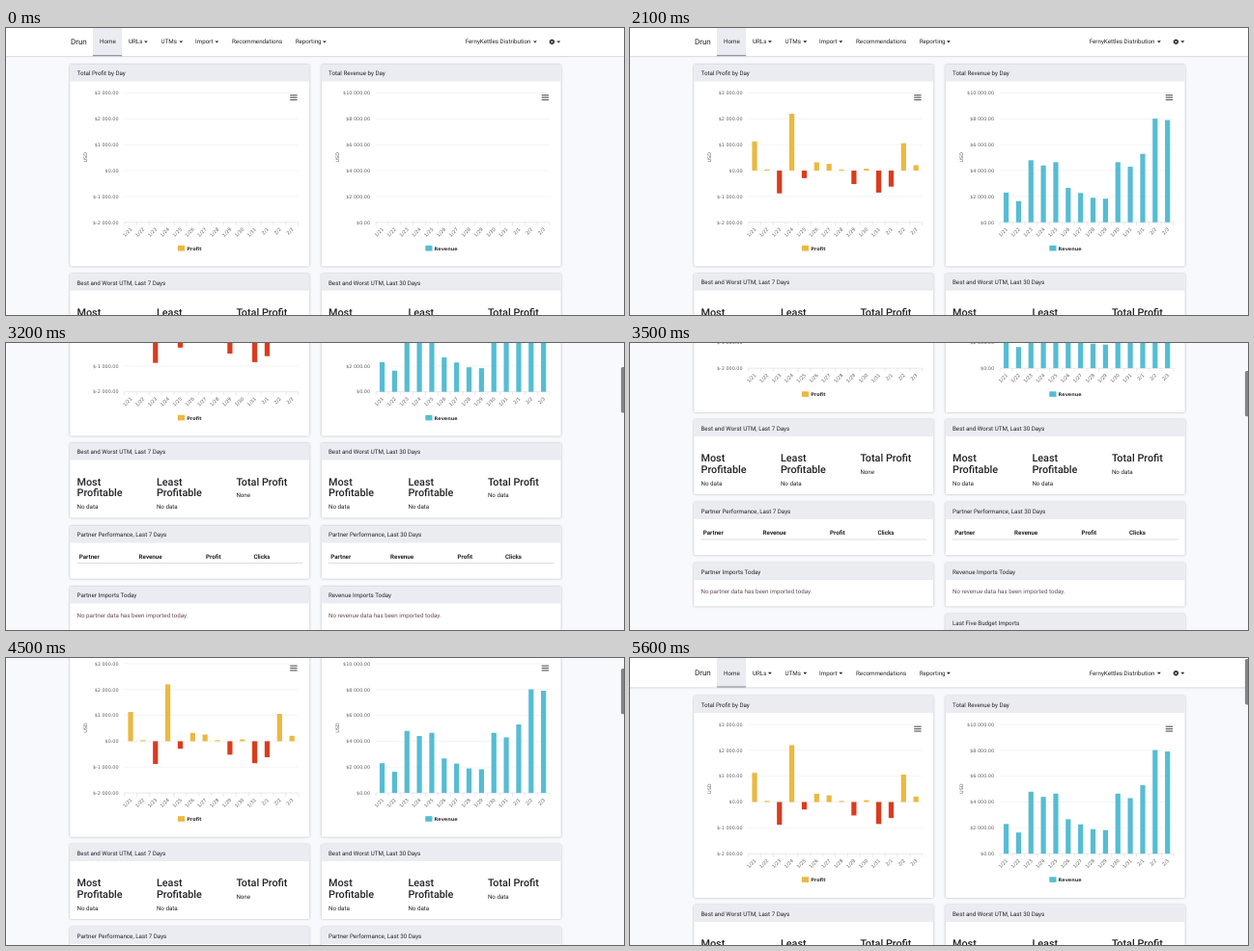
Write an HTML page that moves like this. It is 640 px wide and 298 px high and loops after 5.7 s.

```html
<!DOCTYPE html>
<html lang="en">
<head>
<meta charset="utf-8">
<title>Dashboard</title>
<style>
html, body { margin: 0; width: 100%; height: 100%; overflow: hidden; background: #f8f9fc; }
svg { display: block; text-rendering: geometricPrecision; }
text { font: 6.22px Roboto, sans-serif; fill: #232328; }
.brand { font-size: 8px; }
.big { font-size: 10.8px; font-weight: 500; }
.th { font-weight: 700; }
.note { fill: #6b4b50; }
.axis { font: 4.9px "DejaVu Sans", sans-serif; fill: #606060; }
.legend { font: bold 4.9px "DejaVu Sans", sans-serif; fill: #333; }
.card { filter: drop-shadow(0 .6px 1.2px rgba(0, 0, 0, .3)); }
.nav { filter: drop-shadow(0 .6px 1px rgba(0, 0, 0, .3)); }
</style>
</head>
<body>
<svg id="stage" width="640" height="298" viewBox="0 0 640 298"></svg>
<script>
const LOOP = 5700, GROW = 850;
const stage = document.getElementById('stage');

const text = (x, y, s, cls = '', extra = '') => `<text x="${x}" y="${y}" class="${cls}" ${extra}>${s}</text>`;
const rect = (x, y, w, h, fill, extra = '') => `<rect x="${x}" y="${y}" width="${w}" height="${h}" fill="${fill}" ${extra}/>`;
const line = (x1, y1, x2, y2, color, w = .5) => `<path d="M${x1} ${y1}L${x2} ${y2}" stroke="${color}" stroke-width="${w}"/>`;
const caret = x => `<path d="M${x} 13.4h3.8l-1.9 2.1z" fill="#232328"/>`;

function card(x, y, h, title) {
  return `<g class="card">${rect(x, y, 248, h, '#fff', 'rx="1.5"')}</g>` +
    `<path d="M${x} ${y + 17.5}v-16q0-1.5 1.5-1.5h245q1.5 0 1.5 1.5v16z" fill="#ebecf1"/>` +
    text(x + 7.3, y + 11.3, title);
}

const dates = Array.from({ length: 14 }, (_, i) => i < 11 ? `1/${21 + i}` : `2/${i - 10}`);
const money = v => `$${v < 0 ? '-' : ''}${v ? Math.abs(v) / 1000 + ' 000' : 0}.00`;

// x is the left edge of the card; values span [min, max]
function chart(x, { title, name, color, min, max, step, values, legendX }) {
  const left = x + 56.4, width = 180, slot = width / 14, top = 67.6, bottom = 201.8;
  const scale = (bottom - top) / (max - min), toY = v => bottom - (v - min) * scale;
  let out = card(x, 38, 209.5, title);
  for (let v = min; v <= max; v += step) {
    out += line(left, toY(v), left + width, toY(v), v === min ? '#ccd3e2' : '#e8e8e8');
    out += text(x + 50.4, toY(v) + 1.8, money(v), 'axis', 'text-anchor="end"');
  }
  dates.forEach((d, i) => {
    const cx = left + slot * (i + .5);
    out += line(left + slot * i, bottom, left + slot * i, bottom + 3.5, '#ccd3e2');
    out += text(0, 0, d, 'axis', `text-anchor="end" transform="translate(${cx + 1.9} 209.4) rotate(-45)"`);
  });
  out += line(left + width, bottom, left + width, bottom + 3.5, '#ccd3e2');
  const bars = values.map((v, i) =>
    rect(left + slot * (i + .5) - 2.6, Math.min(0, -v * scale), 5.2, Math.abs(v) * scale, v < 0 ? '#dc3b1c' : color));
  out += `<g class="bars" data-base="${toY(0)}">${bars.join('')}</g>`;
  out += text(0, 0, 'USD', 'axis', `text-anchor="middle" transform="translate(${x + 18} 134.3) rotate(-90)"`);
  for (const y of [69.8, 72.2, 74.6]) out += line(x + 228, y, x + 235.4, y, '#606060', 1.2);
  return out + rect(legendX, 225.9, 7.2, 5.6, color) + text(legendX + 9.3, 230.7, name, 'legend');
}

function column(x, days, total, source) {
  let out = card(x, 255.2, 77.4, `Best and Worst UTM, Last ${days} Days`);
  const [a, b, c] = [7.3, 89.7, 172.2].map(d => x + d);
  for (const [tx, word] of [[a, 'Most'], [b, 'Least']]) {
    out += text(tx, 298.9, word, 'big') + text(tx, 310.5, 'Profitable', 'big') + text(tx, 323.4, 'No data');
  }
  out += text(c, 298.9, 'Total Profit', 'big') + text(c, 311.6, total);
  out += card(x, 341.2, 54.6, `Partner Performance, Last ${days} Days`);
  ['Partner', 'Revenue', 'Profit', 'Clicks'].forEach((s, i) =>
    out += text(x + [9.6, 71.4, 140.8, 190.2][i], 374.7, s, 'th'));
  out += line(x + 7.3, 379.6, x + 241, 379.6, '#cfcfd4', .7);
  out += card(x, 404.2, 45, `${source} Imports Today`);
  return out + text(x + 7.3, 435.7, `No ${source.toLowerCase()} data has been imported today.`, 'note');
}

function nav() {
  let out = `<g class="nav">${rect(-5, -20, 650, 49, '#fff')}</g>`;
  out += rect(90, -20, 30, 49, '#ebecf1') + rect(90, 28, 30, 1.2, '#9293a5');
  out += text(67, 17, 'Drun', 'brand');
  const items = [[97, 'Home'], [127, 'URLs', 143], [160.5, 'UTMs', 179.4], [196, 'Import', 216.4],
    [234, 'Recommendations'], [299.7, 'Reporting', 328]];
  for (const [x, label, arrow] of items) out += text(x, 16.4, label) + (arrow ? caret(arrow) : '');
  out += text(543.5, 16.4, 'FernyKettles Distribution', '', 'text-anchor="end"') + caret(546) + caret(570.4);
  return out + '<circle cx="565.4" cy="14.4" r="1.7" fill="none" stroke="#232328" stroke-width="1.5"/>' +
    '<circle cx="565.4" cy="14.4" r="2.5" fill="none" stroke="#232328" stroke-width=".9" stroke-dasharray=".98"/>';
}

const profit = {
  title: 'Total Profit by Day', name: 'Profit', color: '#eab940', min: -2000, max: 3000, step: 1000, legendX: 177.9,
  values: [1130, 40, -880, 2200, -290, 320, 260, 40, -520, 70, -850, -620, 1060, 210]
};
const revenue = {
  title: 'Total Revenue by Day', name: 'Revenue', color: '#55bdd3', min: 0, max: 10000, step: 2000, legendX: 434.3,
  values: [2300, 1640, 4800, 4400, 4650, 2670, 2270, 1900, 1830, 4650, 4300, 5300, 8020, 7910]
};

stage.innerHTML = `<g id="page">${chart(66.2, profit)}${chart(326.7, revenue)}
  ${column(66.2, 7, 'None', 'Partner')}${column(326.7, 30, 'No data', 'Revenue')}
  ${card(326.7, 457.2, 80, 'Last Five Budget Imports')}${nav()}</g>
  ${rect(636.9, 0, 5, 47.4, '#858585', 'id="thumb" rx="1.6"')}`;

const page = document.getElementById('page'), thumb = document.getElementById('thumb');
const barGroups = document.querySelectorAll('.bars');

// [time, scroll offset]
const scrollKeys = [[0, 0], [2100, 0], [2200, 4], [2300, 17], [2400, 31], [2500, 38], [2600, 44], [2800, 77],
  [3000, 118], [3200, 151], [3400, 171], [3500, 175.6], [3600, 176.3], [3900, 176.3], [4100, 173], [4200, 168],
  [4300, 146], [4400, 104], [4500, 62], [4600, 32], [4700, 16], [4800, 7.2], [5000, 1], [5200, -.8], [5600, -1.4], [LOOP, -1.4]];

function scrollAt(t) {
  const i = scrollKeys.findIndex(k => k[0] > t);
  const [t0, a] = scrollKeys[i - 1], [t1, b] = scrollKeys[i];
  return a + (b - a) * (t - t0) / (t1 - t0);
}

function draw() {
  const t = performance.now() % LOOP;
  const grow = (1 - Math.cos(Math.PI * Math.min(1, t / GROW))) / 2;
  const scroll = scrollAt(t);
  barGroups.forEach(g => g.setAttribute('transform', `translate(0 ${g.dataset.base}) scale(1 ${grow})`));
  page.setAttribute('transform', `translate(0 ${-scroll})`);
  thumb.setAttribute('y', 1.2 + scroll * .158);
  thumb.setAttribute('visibility', t > 2150 ? 'visible' : 'hidden');
  requestAnimationFrame(draw);
}
draw();
</script>
</body>
</html>
```
